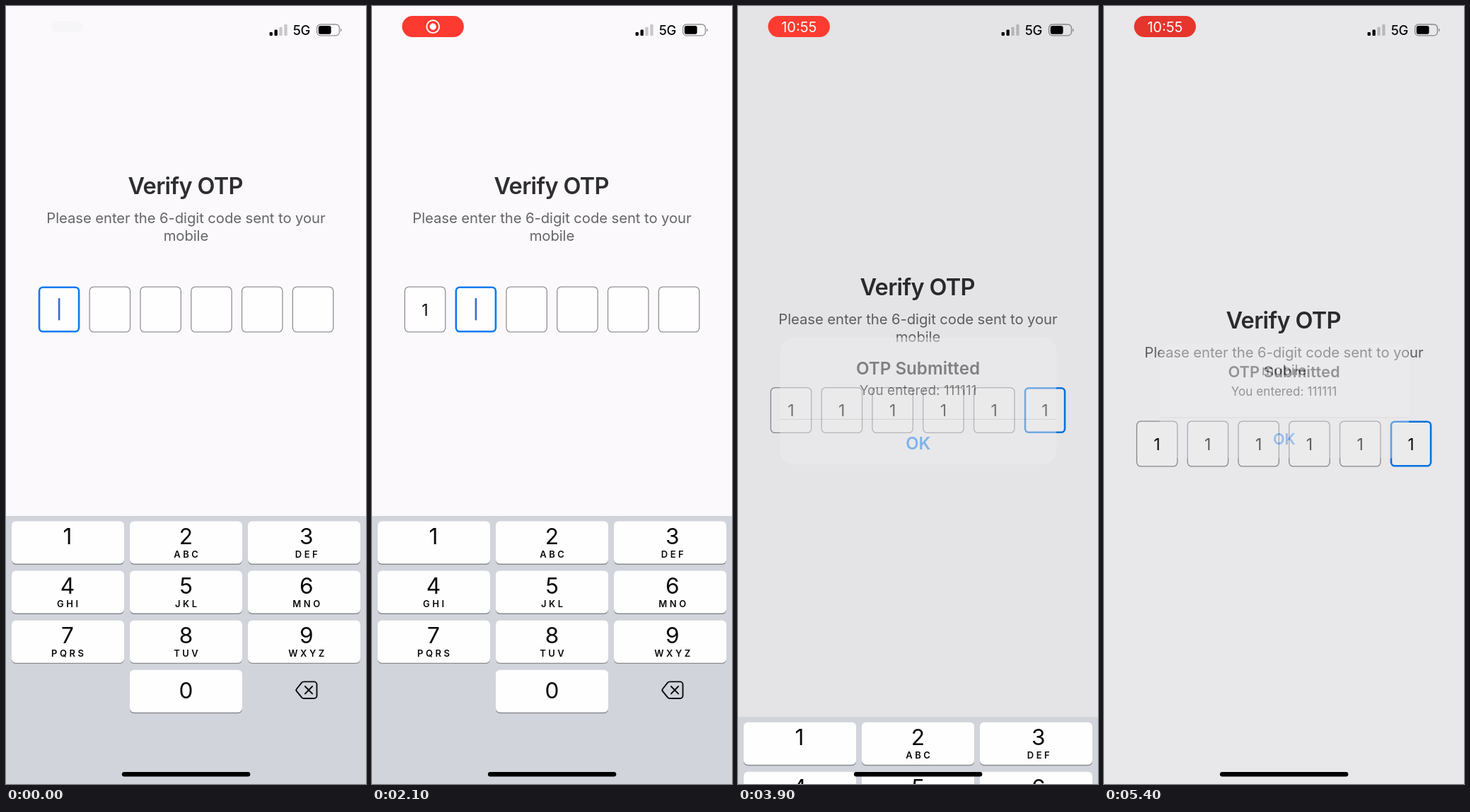
These frames come from a looping animation (509x1100 px, 5500 ms). An HTML page:

```html
<!DOCTYPE html>
<html lang="en">
<head>
<meta charset="utf-8">
<title>Verify OTP</title>
<style>
  html, body { margin: 0; width: 100%; height: 100%; overflow: hidden; background: #fbf9fc; }
  svg { display: block; width: 100vw; height: 100vh; }
  text { font-family: Inter, Roboto, sans-serif; font-optical-sizing: none; text-anchor: middle; }
</style>
</head>
<body>
<svg id="stage" viewBox="0 0 509 1100"></svg>
<script>
const LOOP = 5500, STEP = 100;
const CENTER = 254.5;
const TYPED = [1900, 2300, 2700, 3100, 3500, 3800];
const SUBMIT = 3800, OK_DOWN = 5200, OK_UP = 5300;
const stage = document.getElementById('stage');

function el(tag, attrs, parent = stage) {
  const node = document.createElementNS('http://www.w3.org/2000/svg', tag);
  set(node, attrs);
  parent.appendChild(node);
  return node;
}
function set(node, attrs) {
  for (const k in attrs) node.setAttribute(k, attrs[k]);
}
const group = parent => el('g', {}, parent);
const rect = (parent, x, y, width, height, rx, attrs) =>
  el('rect', { x, y, width, height, rx, ...attrs }, parent);
function label(parent, str, x, y, size, weight, fill, spacing = 0) {
  const node = el('text', {
    x: x + spacing / 2, y, fill,
    'font-size': size, 'font-weight': weight, 'letter-spacing': spacing
  }, parent);
  node.textContent = str;
  return node;
}

const clamp = v => Math.max(0, Math.min(1, v));
const mix = (a, b, p) => a + (b - a) * p;
const blend = (a, b, p) => `rgb(${a.map((v, i) => Math.round(mix(v, b[i], p)))})`;
// Critically damped spring from 0 to 1
const spring = (ms, w) => ms <= 0 ? 0 : 1 - (1 + w * ms / 1000) * Math.exp(-w * ms / 1000);

rect(stage, 0, 0, 509, 1100, 0, { fill: '#fbf9fc' });

// Form
const form = group(stage);
label(form, 'Verify OTP', CENTER - 0.5, 266, 32.5, 600, '#2e2d30', -0.65);
label(form, 'Please enter the 6-digit code sent to your', CENTER, 307, 20.3, 400, '#666568', -0.08);
label(form, 'mobile', CENTER, 332, 20.3, 400, '#666568', -0.08);
const cells = TYPED.map((_, i) => {
  const x = 45.7 + i * 71.8;
  return {
    x,
    box: rect(form, 0, 0, 0, 0, 0, { fill: '#fefefe' }),
    digit: label(form, '1', x + 29.3, 437.5, 23, 400, '#0c0c0d')
  };
});
const caret = rect(form, 0, 413, 2.6, 31.5, 1.2, { fill: '#3c69ca' });

const dim = rect(stage, 0, 0, 509, 1100, 0, { fill: '#000' });

// Number pad
const pad = group(stage);
rect(pad, 0, 721, 509, 379, 0, { fill: '#d2d4dc' });
const LETTERS = ['', 'ABC', 'DEF', 'GHI', 'JKL', 'MNO', 'PQRS', 'TUV', 'WXYZ'];
const TEXT_X = [87, 254.5, 424.8];
function key(digit, letters, col, row) {
  const x = 8 + col * 167, y = 728.5 + row * 70.1;
  rect(pad, x, y + 1.4, 159, 60, 6, { fill: '#898a8e' });
  const face = rect(pad, x, y, 159, 60, 6, { fill: '#fefefe' });
  label(pad, digit, TEXT_X[col], y + (row < 3 ? 32.7 : 40.5), 31.6, 400, '#0a0a0b');
  if (letters) label(pad, letters, TEXT_X[col], y + 51.4, 13, 600, '#0a0a0b', 3.5);
  return face;
}
const keys = LETTERS.map((s, i) => key(i + 1, s, i % 3, Math.floor(i / 3)));
key(0, '', 1, 3);
el('path', {
  d: 'M421 955.4H435.5a4 4 0 0 1 4 4V975a4 4 0 0 1-4 4H421a4 4 0 0 1-2.9-1.3L411 968.9a2.6 2.6 0 0 1 0-3.4L418.1 956.7a4 4 0 0 1 2.9-1.3Z' +
     'M422.9 962l10.2 10.4M433.1 962l-10.2 10.4',
  fill: 'none', stroke: '#0a0a0b', 'stroke-width': 1.9,
  'stroke-linecap': 'round', 'stroke-linejoin': 'round'
}, pad);

// Alert
const alertBox = group(stage);
rect(alertBox, 78.5, 477.5, 352.5, 162, 18, { fill: '#eeeef0' });
const okFace = el('path', {
  d: 'M78.5 582H431V621.5a18 18 0 0 1-18 18H96.5a18 18 0 0 1-18-18Z', fill: '#dddde0'
}, alertBox);
rect(alertBox, 78.5, 581.4, 352.5, 1, 0, { fill: '#c4c4c8' });
label(alertBox, 'OTP Submitted', CENTER, 524.5, 21.8, 600, '#0c0c0d');
label(alertBox, 'You entered: 111111', CENTER, 551, 17, 400, '#0c0c0d', 0.08);
label(alertBox, 'OK', CENTER + 0.3, 620, 21.5, 600, '#1079f6');

// Status bar
const bar = group(stage);
[5, 8.5, 12.2, 16].forEach((h, i) =>
  rect(bar, 372.6 + i * 6.9, 42 - h, 4.3, h, 1.2, { fill: '#000', opacity: i < 2 ? 1 : 0.2 }));
label(bar, '5G', 418, 41, 18.5, 500, '#0a0a0b', -0.3);
rect(bar, 439.6, 26, 31.8, 15.8, 5, {
  fill: 'none', stroke: '#000', 'stroke-width': 1.3, 'stroke-opacity': 0.42
});
rect(bar, 441.8, 28.1, 17.8, 11.6, 2.8, { fill: '#000' });
el('path', { d: 'M473 31.4a2.8 2.8 0 0 1 0 5Z', fill: '#000', opacity: 0.45 }, bar);

const pill = rect(bar, 0, 0, 0, 0, 15, {});
const recIcon = group(bar);
el('circle', { cx: 86.2, cy: 29.2, r: 8.9, fill: 'none', stroke: '#fff', 'stroke-width': 1.9 }, recIcon);
el('circle', { cx: 86.2, cy: 29.2, r: 4.6, fill: '#fff' }, recIcon);
const clock = label(bar, '10:55', 86.3, 36.5, 20, 400, '#fff');

rect(stage, 163.9, 1083.1, 181.4, 6.5, 3.25, { fill: '#000' });

function caretAlpha(t, focus) {
  if (focus) return t - TYPED[focus - 1] < 700 ? 1 : 0;
  const p = t % 1000 / 1000;
  return p < 0.75 ? clamp((0.55 - p) / 0.25) : clamp((p - 0.8) / 0.2);
}

function drawForm(t) {
  const count = TYPED.filter(at => t >= at).length;
  const focus = Math.min(count, 5);
  cells.forEach((c, i) => {
    const on = i === focus, w = on ? 2.6 : 1.3;
    set(c.box, {
      x: c.x + w / 2, y: 396.4 + w / 2, width: 58.7 - w, height: 65.2 - w, rx: 6.5 - w / 2,
      stroke: on ? '#087bf0' : '#929195', 'stroke-width': w
    });
    set(c.digit, { opacity: i < count ? 1 : 0 });
  });
  set(caret, {
    x: cells[focus].x + 28.1,
    opacity: count < 6 ? caretAlpha(t, focus) : 0
  });
  const pressed = TYPED.some(at => t >= at - 100 && t < at);
  set(keys[0], { fill: pressed ? '#b8c2d3' : '#fefefe' });
}

function drawAlert(t) {
  const slide = clamp((t - SUBMIT) / 200);
  const p = 1 - (1 - slide) ** 2;
  set(form, { transform: `translate(0 ${190 * p})` });
  set(pad, { transform: `translate(0 ${379 * p})` });

  const show = spring(t - SUBMIT, 15.5);
  const alpha = show * clamp(1 - (t - OK_UP) * 0.0062);
  const scale = mix(1.2, 1, show);
  set(dim, { opacity: 0.2 * alpha });
  set(alertBox, {
    opacity: alpha,
    transform: `translate(${CENTER} 558.4) scale(${scale}) translate(${-CENTER} -558.4)`
  });
  set(okFace, { opacity: t >= OK_DOWN ? clamp(1 - (t - OK_UP) / 120) : 0 });
}

function drawPill(t) {
  const grow = spring(t, 18);
  const glow = (1 + Math.cos((t - 4000) / 2100 * 2 * Math.PI)) / 2;
  const red = [mix(222, 255, glow), mix(51, 59, glow), mix(43, 48, glow)];
  const w = mix(44, 87.4, grow), h = mix(16, 30, grow);
  set(pill, {
    x: 86.2 - w / 2, y: 29.1 - h / 2, width: w, height: h, rx: h / 2,
    fill: blend([246, 246, 248], red, grow)
  });
  const swap = clamp((t - 2900) / 200);
  set(recIcon, { opacity: grow * (1 - swap) });
  set(clock, { opacity: swap });
}

function render(t) {
  drawForm(t);
  drawAlert(t);
  drawPill(t);
}

// The picture advances ten times a second
const start = performance.now();
function tick() {
  const t = (performance.now() - start) % LOOP;
  render(Math.floor(t / STEP + 0.05) * STEP % LOOP);
  requestAnimationFrame(tick);
}
tick();
</script>
</body>
</html>
```
